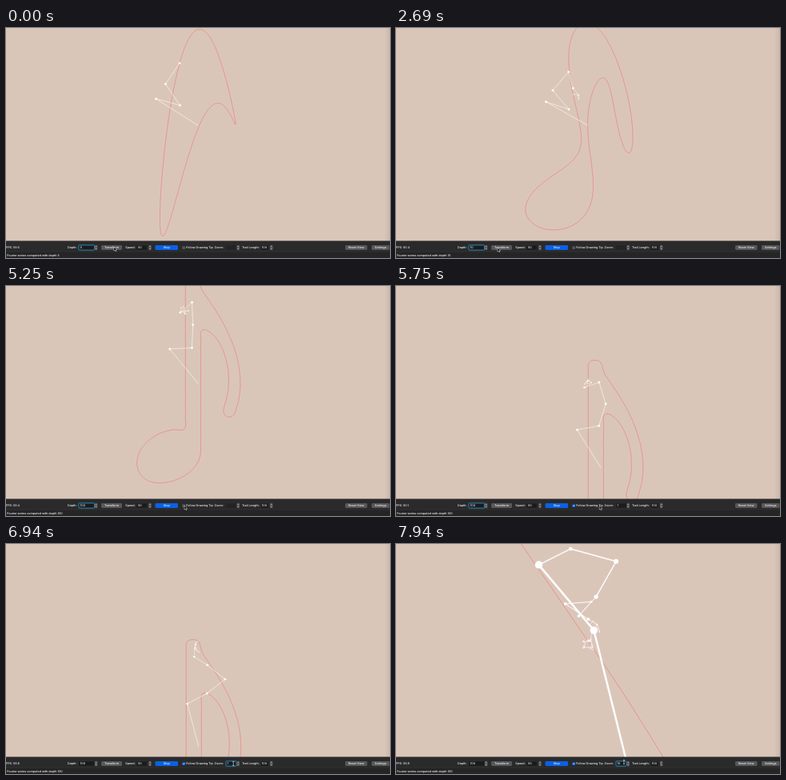
These frames come from a looping animation (480 px wide and 288 px high, 8000 ms). An HTML page with a canvas:

```html
<!DOCTYPE html>
<html lang="en">
<head>
<meta charset="utf-8">
<title>Fourier drawing</title>
<style>
  html, body { margin: 0; width: 100%; height: 100%; overflow: hidden; background: #dac6b9; }
  canvas, svg { position: absolute; left: 0; top: 0; width: 480px; height: 288px; }
  text { font: 500 3.68px Inter, "Liberation Sans", sans-serif; fill: #f4f4f4; text-rendering: geometricPrecision; }
  .mid { text-anchor: middle; }
  .field { fill: #1b1b1c; stroke: #3b3b3c; stroke-width: .4; }
  .field.focus { stroke: #2b86b5; stroke-width: 1; }
  .dim { opacity: .45; }
</style>
</head>
<body>
<canvas id="stage"></canvas>
<svg id="ui" viewBox="0 0 480 288">
  <linearGradient id="edge"><stop stop-color="#b9a497" stop-opacity="0"/><stop offset="1" stop-color="#b9a497" stop-opacity=".45"/></linearGradient>
  <rect x="473" width="7" height="267" fill="url(#edge)"/>
  <rect y="266.5" width="480" height="21.5" fill="#2a2a2b"/>
  <rect y="280" width="480" height="8" fill="#252526"/>
  <rect y="279.8" width="480" height=".5" fill="#3b3b3c"/>
</svg>
<script>
const LOOP = 8000, PERIOD = 24800, SAMPLES = 900;
const CENTER = { x: 240.3, y: 122 };
const NOTE = 'M224.3 76V-6.5C224.3 -10.3 227 -12.3 231 -12.3H235C239 -12.3 241.5 -9 242 -5' +
  'C242.6 0 245 5 248 9.5C262 29.5 293 72 293 122C293 138 290 148 286.5 158' +
  'C284.5 166.5 272 166.5 272 156C272 150 278.5 140 278.5 118C278.5 84 262 57 248 54.5' +
  'C245 54 243.5 55.5 243.5 58V206C243.5 230 216 247 191 247C175 247 163.5 236 163.5 222' +
  'C163.5 199 192 177 219 180.5C222.5 181 224.3 179 224.3 175Z';
const NOTE_HEIGHT = 259;

// Each run restarts the drawing; phase is the clock time at which the pen sits at the path start.
const RUNS = [
  { from: 0, depth: 5, phase: 70 },
  { from: 2590, depth: 10, phase: 2970 },
  { from: 3680, depth: 100, phase: 4060 }
];
const FOLLOW_AT = 5450, ZOOM_FOCUS_AT = 6000, ZOOM_AT = 6950;
const TYPED = [[0, '5'], [1500, '1'], [1680, '10'], [3330, '100']];
const FPS = [59.6, 60.1, 59.8, 60.3, 59.7, 60.4, 60.0, 59.9, 60.4, 60.2, 59.4, 60.1, 60.3, 59.8, 60.5, 59.8];
const POINTER = [
  [0, 135, 274], [300, 135, 274], [800, 98, 274], [1900, 98, 274], [2400, 127, 275],
  [2780, 127, 275], [3060, 101, 274], [3380, 101, 274], [3640, 133, 275], [4300, 133, 275],
  [4950, 223, 275], [5550, 223, 275], [5950, 285, 275], [7400, 284, 275], [7940, 285, 273]
];

const svgNS = 'http://www.w3.org/2000/svg';
const ui = document.getElementById('ui');

function add(tag, attrs, content) {
  const el = document.createElementNS(svgNS, tag);
  for (const name in attrs) el.setAttribute(name, attrs[name]);
  if (content !== undefined) el.textContent = content;
  return ui.appendChild(el);
}
const label = (x, content, y = 276.4) => add('text', { x, y }, content);
const field = (x, width) => add('rect', { x, y: 271.9, width, height: 6.2, rx: .6, class: 'field' });
function button(x, width, content, fill = '#58585a') {
  add('rect', { x, y: 272, width, height: 5.9, rx: 1.3, fill });
  add('text', { x: x + width / 2, y: 276.4, class: 'mid' }, content);
}
function stepper(x) {
  add('rect', { x: x - 1.7, y: 271.7, width: 3.4, height: 6.6, rx: 1, fill: '#555557' });
  add('path', { d: `M${x - .9} 274.2l.9 -1 .9 1M${x - .9} 275.8l.9 1 .9 -1`, fill: 'none', stroke: '#e6e6e6', 'stroke-width': .5 });
}

const fpsText = label(0, '');
label(77, 'Depth:');
const depthField = field(91, 19.5);
const depthText = label(92.8, '');
stepper(112.7);
button(119, 26, 'Transform');
label(149.3, 'Speed:');
field(163, 13.5);
label(165, '50');
stepper(180);
button(186.5, 28.5, 'Stop', '#0b61e4');
const checkBox = add('rect', { x: 220.3, y: 273.2, width: 3.8, height: 3.8, rx: .8 });
const checkMark = add('path', { d: 'M221.2 275.1l.8 .9 1.3 -1.9', fill: 'none', stroke: '#fff', 'stroke-width': .6 });
label(225.3, 'Follow Drawing Tip');
label(260.6, 'Zoom:');
const zoomField = field(275, 13);
const zoomText = label(276.4, '');
stepper(290.2);
label(295, 'Trail Length:');
field(318.5, 9.5);
label(319.8, '100');
stepper(331.7);
button(424, 27.5, 'Reset View');
button(457, 22.5, 'Settings');
const statusText = label(1.2, '', 285.5);
const arrow = add('path', { d: 'M0 0V5L1.2 4 2 5.8 2.9 5.4 2.1 3.7H3.6Z', fill: '#000', stroke: '#fff', 'stroke-width': .45 });
const beam = add('path', { d: 'M-1 -2.6Q0 -2.6 0 -2V2Q0 2.6 1 2.6M1 -2.6Q0 -2.6 0 -2M0 2Q0 2.6 -1 2.6', fill: 'none', stroke: '#fff', 'stroke-width': .6 });

// Fourier coefficients of the outline, evenly sampled along its length.
const outline = document.createElementNS(svgNS, 'path');
outline.setAttribute('d', NOTE);
const total = outline.getTotalLength();
const points = Array.from({ length: SAMPLES }, (_, i) => outline.getPointAtLength(total * i / SAMPLES));

function coefficient(k) {
  let x = 0, y = 0;
  points.forEach((p, i) => {
    const a = -2 * Math.PI * k * i / SAMPLES, c = Math.cos(a), s = Math.sin(a);
    x += p.x * c - p.y * s;
    y += p.x * s + p.y * c;
  });
  x /= SAMPLES;
  y /= SAMPLES;
  return { k, x, y, size: Math.hypot(x, y) };
}
const base = coefficient(0);
const allArms = Array.from({ length: 99 }, (_, i) => coefficient((i % 2 ? -1 : 1) * ((i >> 1) + 1)));

function chain(arms, scale, turn) {
  let x = base.x, y = base.y;
  return [{ x, y }].concat(arms.map(arm => {
    const a = 2 * Math.PI * arm.k * turn, c = Math.cos(a) * scale, s = Math.sin(a) * scale;
    x += arm.x * c - arm.y * s;
    y += arm.x * s + arm.y * c;
    return { x, y };
  }));
}

for (const run of RUNS) {
  run.arms = allArms.slice(0, run.depth - 1);
  const curve = Array.from({ length: 1400 }, (_, i) => chain(run.arms, 1, i / 1400).pop());
  const ys = curve.map(p => p.y);
  run.scale = NOTE_HEIGHT / (Math.max(...ys) - Math.min(...ys));
  run.trail = new Path2D();
  for (const p of curve) {
    run.trail.lineTo(base.x + (p.x - base.x) * run.scale, base.y + (p.y - base.y) * run.scale);
  }
  run.trail.closePath();
}

const canvas = document.getElementById('stage');
const ctx = canvas.getContext('2d');
const ratio = window.devicePixelRatio || 1;
canvas.width = 480 * ratio;
canvas.height = 288 * ratio;

const latest = (list, time, key) => list.filter(item => item[key] <= time).pop();

function drawScene(time) {
  const run = latest(RUNS, time, 'from');
  const joints = chain(run.arms, run.scale, (time - run.phase) / PERIOD);
  const tip = joints[joints.length - 1];
  const zoom = time >= ZOOM_AT ? 10 : 1;
  const focus = time >= FOLLOW_AT ? tip : CENTER;
  const view = p => ({ x: CENTER.x + (p.x - focus.x) * zoom, y: CENTER.y + (p.y - focus.y) * zoom });

  ctx.setTransform(ratio, 0, 0, ratio, 0, 0);
  ctx.fillStyle = '#dac6b9';
  ctx.fillRect(0, 0, 480, 288);

  ctx.save();
  ctx.translate(CENTER.x, CENTER.y);
  ctx.scale(zoom, zoom);
  ctx.translate(-focus.x, -focus.y);
  ctx.lineWidth = .62 / zoom;
  ctx.strokeStyle = '#ee7274';
  ctx.stroke(run.trail);
  ctx.restore();

  ctx.strokeStyle = zoom === 1 ? 'rgba(255,252,246,.8)' : '#fff';
  ctx.fillStyle = '#fff';
  const cap = zoom === 1 ? 1.4 : 4.75;
  run.arms.forEach((arm, i) => {
    const length = arm.size * run.scale * zoom;
    const radius = Math.min(cap, length * .046 + .3);
    const a = view(joints[i]), b = view(joints[i + 1]);
    ctx.lineWidth = Math.max(.5, radius * .52);
    ctx.beginPath();
    ctx.moveTo(a.x, a.y);
    ctx.lineTo(b.x, b.y);
    ctx.stroke();
    if (length < .6) return;
    ctx.beginPath();
    ctx.arc(b.x, b.y, radius, 0, 2 * Math.PI);
    ctx.fill();
  });
}

function pointerAt(time) {
  const next = POINTER.findIndex(p => p[0] > time);
  if (next < 0) return POINTER[POINTER.length - 1].slice(1);
  const a = POINTER[next - 1], b = POINTER[next];
  const u = (time - a[0]) / (b[0] - a[0]), e = u * u * (3 - 2 * u);
  return [a[1] + (b[1] - a[1]) * e, a[2] + (b[2] - a[2]) * e];
}

function drawInterface(time) {
  const following = time >= FOLLOW_AT, zoomFocused = time >= ZOOM_FOCUS_AT;
  fpsText.textContent = 'FPS: ' + FPS[Math.floor(time / 500)].toFixed(1);
  depthText.textContent = latest(TYPED, time, 0)[1];
  statusText.textContent = 'Fourier series computed with depth ' + latest(RUNS, time, 'from').depth;
  depthField.classList.toggle('focus', !zoomFocused);
  zoomField.classList.toggle('focus', zoomFocused);
  zoomField.classList.toggle('dim', !following);
  zoomText.textContent = !following ? '' : time >= ZOOM_AT ? '10' : '1';
  checkBox.setAttribute('fill', following ? '#0b61e4' : '#555557');
  checkMark.style.display = following ? '' : 'none';

  const [x, y] = pointerAt(time);
  const overField = (x > 91 && x < 110) || (x > 275 && x < 288);
  arrow.style.display = overField ? 'none' : '';
  beam.style.display = overField ? '' : 'none';
  (overField ? beam : arrow).setAttribute('transform', `translate(${x} ${y})`);
}

const start = performance.now();
function frame() {
  const time = (performance.now() - start) % LOOP;
  drawScene(time);
  drawInterface(time);
  requestAnimationFrame(frame);
}
frame();
</script>
</body>
</html>
```
